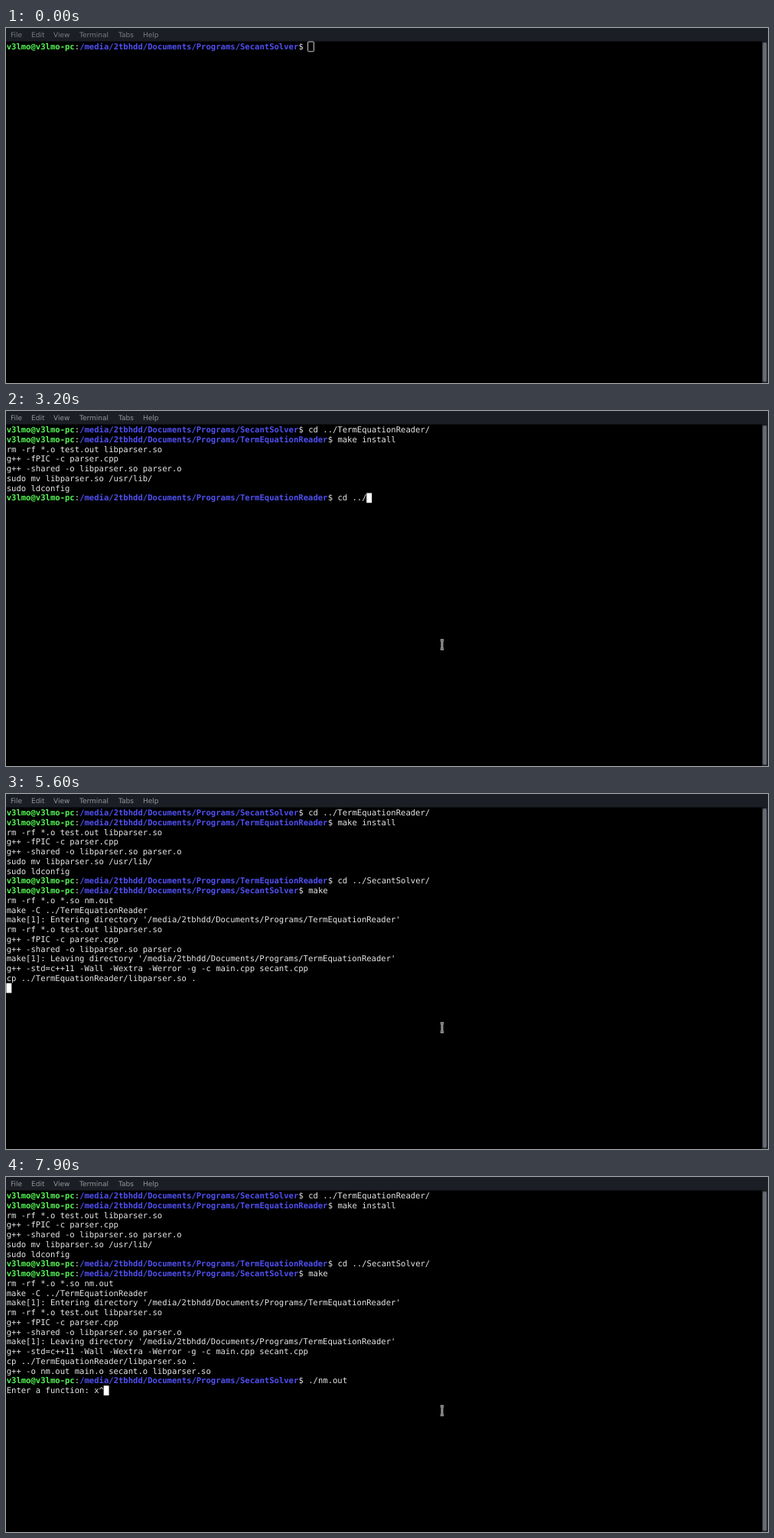
An HTML page that plays this animation: 996 by 465 pixels, repeating every 8 s.

```html
<!DOCTYPE html>
<html lang="en">
<head>
<meta charset="utf-8">
<title>Terminal session</title>
<style>
  html, body { margin: 0; width: 100%; height: 100%; overflow: hidden; background: #000; }
  svg { display: block; width: 996px; height: 465px; }
  text { white-space: pre; text-rendering: geometricPrecision; }
  #menu { font: 9px "DejaVu Sans", sans-serif; }
  #screen { font: 10.57px "DejaVu Sans Mono", monospace; fill: #e6e6e6; }
  #screen .user { fill: #54f854; font-weight: bold; }
  #screen .path { fill: #5050f4; font-weight: bold; }
  #mouse path { fill: none; }
</style>
</head>
<body>
<svg id="stage" viewBox="0 0 996 465" xmlns="http://www.w3.org/2000/svg">
  <filter id="soften" filterUnits="userSpaceOnUse" x="0" y="0" width="996" height="465" color-interpolation-filters="sRGB">
    <feGaussianBlur stdDeviation="0.4"/>
  </filter>
  <rect width="996" height="465" fill="#000"/>
  <rect x="988" y="17.5" width="8" height="447.5" fill="#20232a"/>
  <rect x="989.2" y="19" width="5" height="444.5" rx="2" fill="#696b73"/>
  <rect width="996" height="17.5" fill="#1b1e25"/>
  <g filter="url(#soften)">
    <g id="menu"></g>
    <g id="screen"></g>
    <rect id="caret"/>
    <g id="mouse">
      <path d="M-2.2 -5.8H2.2M0 -5.8V5.8M-2.2 5.8H2.2" stroke="#c8c8c8" stroke-width="2.8"/>
      <path d="M-2.2 -5.8H2.2M0 -5.8V5.8M-2.2 5.8H2.2" stroke="#303030" stroke-width="0.8"/>
    </g>
  </g>
</svg>
<script>
const LOOP = 8000, CELL_W = 6.363, CELL_H = 12.755, LEFT = 0.7, TOP = 18.2, BASE = 9.9;
const ROOT = "/media/2tbhdd/Documents/Programs/";
const SOLVER = "SecantSolver", READER = "TermEquationReader";
const $ = id => document.getElementById(id);
const menu = $("menu"), screen = $("screen"), caret = $("caret"), mouse = $("mouse");

function addText(parent, x, y, text, cls) {
  const el = document.createElementNS("http://www.w3.org/2000/svg", "text");
  el.setAttribute("x", x);
  el.setAttribute("y", y);
  if (cls) el.setAttribute("class", cls);
  el.textContent = text;
  return parent.appendChild(el);
}

function setAttrs(el, attrs) {
  for (const key in attrs) el.setAttribute(key, attrs[key]);
}

[["File", 6], ["Edit", 33], ["View", 62], ["Terminal", 96], ["Tabs", 147], ["Help", 179]]
  .forEach(([label, x]) => addText(menu, x, 12, label));

// Runs of terminal text; step > 0 types one letter at a time.
const runs = [];
let row = 0, col = 0;

function put(at, text, step = 0, cls = "") {
  const el = addText(screen, LEFT + col * CELL_W, TOP + BASE + row * CELL_H, "", cls);
  runs.push({ at, text, step, row, col, el });
  col += text.length;
}

function enter(at) {
  row++;
  col = 0;
  put(at, "");
}

function print(at, ...lines) {
  for (const line of lines) {
    put(at, line);
    enter(at);
  }
}

function prompt(at, dir) {
  put(at, "v3lmo@v3lmo-pc", 0, "user");
  put(at, ":");
  put(at, ROOT + dir, 0, "path");
  put(at, "$ ");
}

const clean = "rm -rf *.o test.out libparser.so";
const compile = "g++ -fPIC -c parser.cpp";
const link = "g++ -shared -o libparser.so parser.o";

prompt(0, SOLVER);
put(800, "cd ../T", 60);
put(1200, READER.slice(1) + "/");
enter(1300);
prompt(1300, READER);
put(1400, "make install", 50);
enter(2000);
print(2000, clean, compile);
print(2300, link, "sudo mv libparser.so /usr/lib/", "sudo ldconfig");
prompt(2300, READER);
put(2500, "cd ../", 125);
put(3300, SOLVER[0]);
put(3500, SOLVER.slice(1) + "/");
enter(3700);
prompt(3700, SOLVER);
put(3900, "ma", 100);
put(4200, "ke", 100);
enter(4500);
print(4500, "rm -rf *.o *.so nm.out", "make -C ../" + READER,
  `make[1]: Entering directory '${ROOT + READER}'`, clean, compile);
print(5000, link, `make[1]: Leaving directory '${ROOT + READER}'`,
  "g++ -std=c++11 -Wall -Wextra -Werror -g -c main.cpp secant.cpp");
print(5600, `cp ../${READER}/libparser.so .`);
print(5700, "g++ -o nm.out main.o secant.o libparser.so");
prompt(5700, SOLVER);
put(5800, "./n", 100);
put(6300, "m");
put(6500, ".");
put(6600, "out ");
enter(6900);
put(6900, "Enter a function: ");
put(7600, "x");
put(7900, "^");

function drawRuns(t) {
  let end = runs[0];
  let count = 0;
  for (const run of runs) {
    const shown = t < run.at ? 0
      : run.step ? Math.min(run.text.length, Math.floor((t - run.at) / run.step + 1e-6) + 1)
      : run.text.length;
    const part = run.text.slice(0, shown);
    if (run.el.textContent !== part) run.el.textContent = part;
    if (t >= run.at) {
      end = run;
      count = shown;
    }
  }
  return { x: LEFT + (end.col + count) * CELL_W, y: TOP + end.row * CELL_H };
}

function draw(t) {
  const focused = t >= 100;
  const { x, y } = drawRuns(t);
  menu.setAttribute("fill", focused ? "#94969a" : "#7b7d82");
  setAttrs(caret, focused
    ? { x: x - 0.3, y, width: 6.9, height: 12.8, rx: 0, fill: "#fff", stroke: "none" }
    : { x: x - 0.6, y: y - 0.2, width: 7.8, height: 12.8, rx: 1, fill: "none", stroke: "#cfcfcf" });

  const p = Math.min(1, Math.max(0, (t - 100) / 400));
  const rest = (1 - p) ** 3;
  mouse.setAttribute("transform", `translate(${570 - 90 * rest} ${306 - 300 * rest})`);
  mouse.setAttribute("visibility", focused ? "visible" : "hidden");
}

const start = performance.now();
function tick() {
  draw((performance.now() - start) % LOOP);
  requestAnimationFrame(tick);
}
tick();
</script>
</body>
</html>
```
